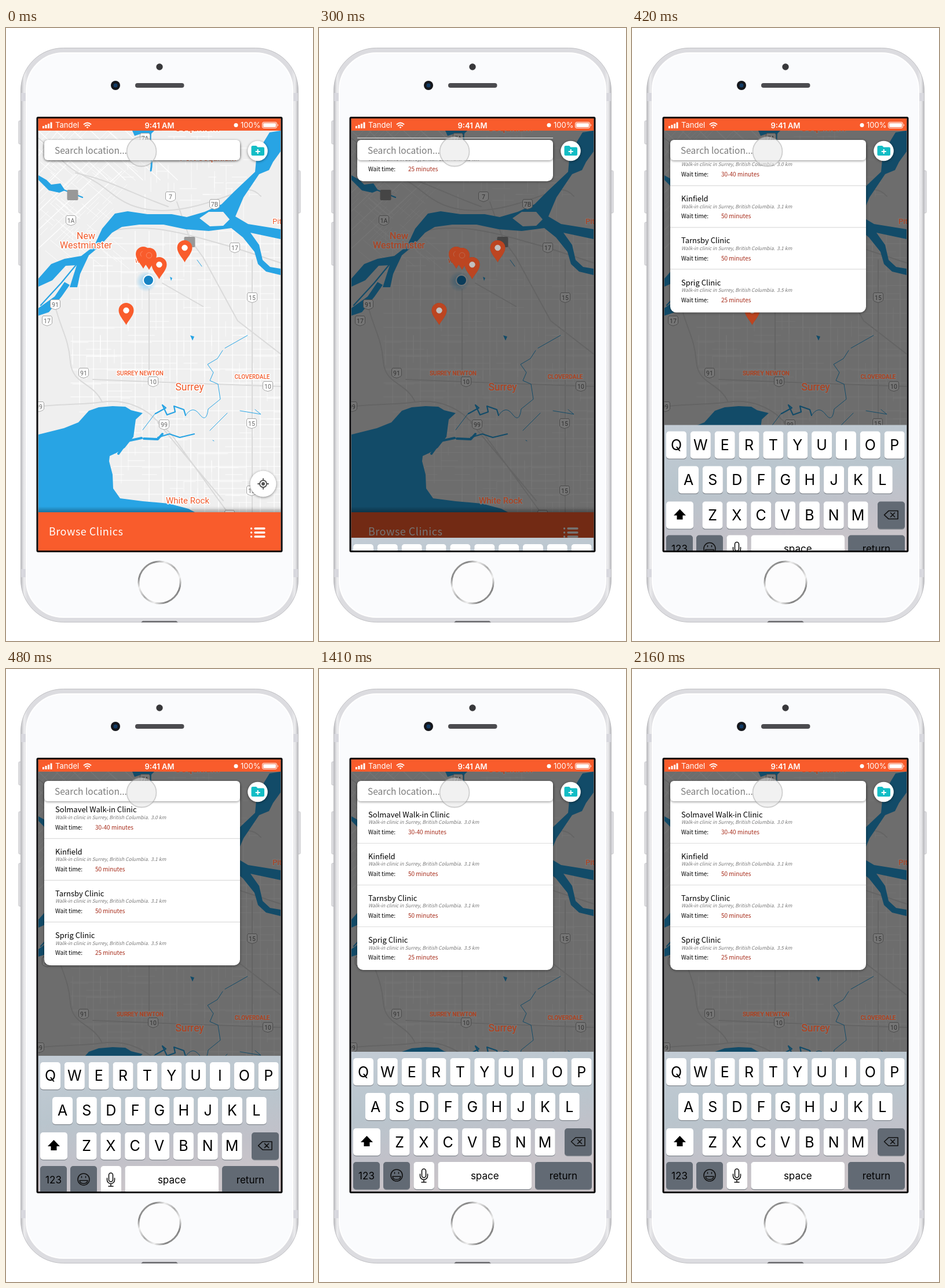
Animation of 530 by 1057 pixels, one loop 2190 ms. Source, as an HTML page:

```html
<!DOCTYPE html>
<html lang="en">
<head>
<meta charset="utf-8">
<title>Clinic search</title>
<style>
  html, body { margin: 0; width: 100%; height: 100%; overflow: hidden; background: #fff; }
  svg { display: block; width: 100vw; height: 100vh; }
  .ui { font-family: "Noto Sans CJK SC", "Noto Sans CJK JP", "Noto Sans CJK", "Open Sans", sans-serif; }
  .ios { font-family: Inter, Roboto, sans-serif; }
  .mid { text-anchor: middle; }
  .place { font-family: Roboto, sans-serif; fill: #f05a2b; text-anchor: middle; }
  .halo .place { stroke: #fff; stroke-width: 3; stroke-linejoin: round; }
  .shield { font: 10.5px Roboto, sans-serif; text-anchor: middle; fill: #666; }
  .line { fill: none; stroke-linecap: round; stroke-linejoin: round; }
  .soft { filter: drop-shadow(0 1px 2px rgba(0, 0, 0, .45)); }
</style>
</head>
<body>
<svg viewBox="0 0 530 1057">
  <defs>
    <clipPath id="screen"><rect x="55.5" y="156" width="419" height="745.5"/></clipPath>
    <clipPath id="below"><rect x="55.5" y="193" width="419" height="709"/></clipPath>
    <clipPath id="content"><rect x="55.5" y="177" width="419" height="725"/></clipPath>
    <linearGradient id="rim">
      <stop offset="0" stop-color="#b9b9bd"/><stop offset=".012" stop-color="#ececee"/>
      <stop offset=".024" stop-color="#dcdce0"/><stop offset=".976" stop-color="#dcdce0"/>
      <stop offset=".988" stop-color="#ececee"/><stop offset="1" stop-color="#b9b9bd"/>
    </linearGradient>
    <linearGradient id="ring" x2="1" y2="1">
      <stop offset="0" stop-color="#aaa"/><stop offset=".2" stop-color="#888"/>
      <stop offset=".32" stop-color="#eee"/><stop offset=".5" stop-color="#aaa"/>
      <stop offset=".68" stop-color="#f0f0f0"/><stop offset=".82" stop-color="#808080"/>
      <stop offset="1" stop-color="#ccc"/>
    </linearGradient>
    <linearGradient id="board" x2=".25" y2="1">
      <stop offset="0" stop-color="#c3ccd5"/><stop offset=".45" stop-color="#b9c5cd"/>
      <stop offset=".75" stop-color="#c1c1c9"/><stop offset="1" stop-color="#cbc5c9"/>
    </linearGradient>
    <linearGradient id="barShadow" x2="0" y2="1">
      <stop offset="0" stop-opacity="0"/><stop offset="1" stop-opacity=".3"/>
    </linearGradient>
    <radialGradient id="glow"><stop offset=".3" stop-color="#4db5ee" stop-opacity=".5"/><stop offset="1" stop-color="#4db5ee" stop-opacity="0"/></radialGradient>
    <path id="pin" fill="#f95c2c" d="M0 0C-4-8-13-16-13-25A13 13 0 0 1 13-25C13-16 4-8 0 0Z"/>
    <path id="badge" fill="#fff" stroke="#a5a5a5" d="M-7-8.5H7L8.5-6V3C8.5 6 5 7 0 8.5C-5 7-8.5 6-8.5 3V-6Z"/>
  </defs>

  <!-- phone -->
  <g fill="#e0e0e3" stroke="#b4b4b8" stroke-width=".8">
    <rect x="22" y="160" width="5" height="40" rx="1.5"/><rect x="22" y="246" width="5" height="73" rx="1.5"/>
    <rect x="22" y="335" width="5" height="74" rx="1.5"/><rect x="503" y="246" width="5" height="73" rx="1.5"/>
    <rect x="25.5" y="34.5" width="479" height="990" rx="73" fill="url(#rim)"/>
  </g>
  <path d="M26 112h10v14H26zM494 112h10v14h-10zM26 933h10v14H26zM494 933h10v14h-10z" fill="#d8d8de"/>
  <rect x="35" y="43" width="460" height="973" rx="64" fill="#fafbfd" stroke="#fff" stroke-width="2"/>
  <path d="M233 1025l3-2.5h58l3 2.5z" fill="#66666a"/>
  <circle cx="265" cy="67" r="5.7" fill="#38383b"/>
  <circle cx="189" cy="99" r="8" fill="#15171c"/><circle cx="189" cy="99" r="3.5" fill="#123c66"/>
  <rect x="223" y="95" width="84.5" height="8" rx="4" fill="#4b4b4f"/>
  <circle cx="265" cy="956" r="36" fill="#fcfcfd" stroke="url(#ring)" stroke-width="3"/>

  <g clip-path="url(#screen)">
    <rect x="55" y="156" width="420" height="746" fill="#efefef"/>
    <g id="streets" class="line" stroke="#fff"></g>
    <g class="line" stroke="#dadada" stroke-width="2">
      <path d="M56 190C85 212 100 240 135 255S185 293 215 305S290 320 352 300S420 270 440 290"/>
      <path d="M120 250C180 262 215 285 280 308M295 300L318 365L340 395L400 505L474 562M270 440L340 480M85 480C95 520 108 535 111 575S150 610 166 645M56 653C90 648 130 650 166 645S230 652 250 667L285 700L386 840M262 680L375 815M247 450V605M150 606L250 610L474 618M425 400V835M180 350C250 335 310 355 395 379L474 405"/>
    </g>
    <g fill="#28a4e4">
      <path fill-rule="evenodd" d="M166 346L188 320L210 316L244 321L286 321L312 326L343 317L372 304L394 282L430 248L433 216L455 180L474 177V213L461 231L454 245L437 252L410 292L396 325L418 338L474 347V364L422 353L437 374L443 400L456 412L474 415V426L449 420L435 407L429 386L409 361L389 345L350 350L310 347L272 339L230 339L200 343L183 353L161 377L143 392L128 424L123 447H110L122 409L103 410L80 435L56 446V432L78 407L101 398L130 393L152 376ZM334 328L350 317L375 317L386 330L375 341L352 342Z"/>
      <path d="M110 443L96 463L74 490L56 496V483L84 463L101 438Z"/>
      <path d="M56 701L100 690L125 680L143 660L160 654L184 652L206 653L216 659L236 664L224 675L220 705L205 724L190 733L179 738L178 747L184 770L185 794L197 811L236 816L281 820L315 829L328 836H56Z"/>
      <path d="M56 254L70 262L78 270L94 268L102 280L92 284L74 280L56 262ZM218 177H256L247 186L234 182L222 186ZM318 530L325 532L322 539ZM283 429L287 431L285 436Z"/>
    </g>
    <g class="line" stroke="#28a4e4">
      <path stroke-width="4" d="M194 734L210 712L234 707M238 708L262 709L270 700"/>
      <path stroke-width="2.2" d="M262 706L282 700L300 706L325 700M97 278L132 292M60 478L95 440L128 400M258 665L276 655L270 650L278 667L292 662L290 652L307 658L310 668"/>
      <path d="M236 693L258 664M310 668Q322 650 334 666T349 657L370 640L366 614L352 608L358 594L348 580L365 570L374 556M378 552L417 530M352 694L382 664M404 660L440 666L430 658M357 711L359 712M330 400L338 411"/>
      <path stroke-width="3" d="M250 177C246 200 255 225 250 246"/>
    </g>
    <g fill="#989898"><rect x="105.500" y="279" width="19" height="18" rx="2"/><rect x="307.500" y="360" width="19" height="18" rx="2"/></g>
    <g id="shields" class="shield"></g>
    <circle cx="242" cy="437" r="18" fill="url(#glow)"/>
    <circle cx="246" cy="435" r="9" fill="#1684c4" stroke="#fff" stroke-width="2"/>
    <g id="halos" class="halo"></g>
    <g id="marks"></g>

    <rect x="55" y="825" width="420" height="10" fill="url(#barShadow)"/>
    <rect x="55" y="835" width="420" height="67" fill="#f95c2c"/>
    <text id="browse" class="ui" y="875" font-size="18" letter-spacing=".5" fill="#fff">Browse Clinics</text>
    <path d="M430 863H446M430 870H446M430 877H446M423.500 863h.1M423.500 870h.1M423.500 877h.1" class="line" stroke="#fff" stroke-width="3.300"/>

    <g id="locate">
      <circle class="soft" cx="444" cy="786" r="22.500" fill="#fff"/>
      <g class="line" stroke="#555" stroke-width="1.800"><circle cx="444" cy="786" r="6"/><path d="M444 777v3M444 792v3M435 786h3M450 786h3"/></g>
      <circle cx="444" cy="786" r="3" fill="#555"/>
    </g>

    <!-- labels and pins stay brighter than the shaded map -->
    <g id="shade">
      <rect x="55" y="156" width="420" height="746" fill-opacity=".54"/>
      <use href="#marks" opacity=".55"/>
    </g>

    <g clip-path="url(#below)">
      <rect id="panel" class="soft" x="66" y="193" width="338" rx="10" fill="#fff"/>
      <g id="clinics" class="ui"></g>
    </g>
    <rect class="soft" x="66" y="193" width="338" height="35" rx="6" fill="#fff"/>
    <text class="ui" x="84" y="217" font-size="15.500" fill="#7c7c7c">Search location...</text>
    <g clip-path="url(#content)"><path id="dividers" d="M66 300.500H404M66 372.500H404M66 444.500H404" stroke="#dcdcdc" stroke-width="1.200"/></g>

    <circle class="soft" cx="434.500" cy="212" r="17.300" fill="#fff"/>
    <path d="M426 203H432L434.500 205.500H444Q446 205.500 446 207.500V218Q446 220 444 220H425.500Q423.500 220 423.500 218V205Q423.500 203 426 203Z" fill="#13bdc5"/>
    <path d="M434.700 209v8M430.700 213h8" stroke="#fff" stroke-width="2"/>
    <circle cx="234" cy="213" r="25.500" fill="#e6e6e6" fill-opacity=".55" stroke="#999" stroke-opacity=".45" stroke-width="1.800"/>

    <g id="keyboard" class="ios">
      <rect x="55" y="660" width="420" height="243" fill="url(#board)"/>
      <g id="keys"></g>
      <path d="M82.500 805L93 816H87.500V823H77.500V816H72Z"/>
      <g class="line" stroke="#111" stroke-width="1.600">
        <path d="M443 808H459V822H443L435.500 815ZM446.500 811.500L453.500 818.500M453.500 811.500L446.500 818.500"/>
        <circle cx="134" cy="873" r="10"/><path d="M127 875H141C140 882 128 882 127 875Z"/>
        <path d="M130.500 868v2M137.500 868v2M174.500 871v3a6.500 6.500 0 0 0 13 0v-3M181 881v4M177 885h8"/>
        <rect x="177.500" y="862" width="7" height="15" rx="3.500"/>
      </g>
    </g>

    <!-- status bar -->
    <rect x="55" y="156" width="420" height="21" fill="#f95c2c"/>
    <g class="ios" fill="#fff" font-size="13">
      <path d="M63 169h3v4h-3zM67.500 167h3v6h-3zM72 165h3v8h-3zM76.500 162.500h3V173h-3z"/>
      <text x="85" y="172">Tandel</text>
      <text x="265" y="172.500" class="mid" font-weight="600">9:41 AM</text>
      <circle cx="397" cy="167.500" r="3.500"/>
      <text x="405" y="172">100%</text>
      <rect x="442.500" y="162.500" width="25" height="10" rx="2.500" fill="none" stroke="#fff"/>
      <rect x="444" y="164" width="22" height="7" rx="1.300"/><path d="M469 165.500q2 2 0 4z"/>
      <path d="M134.500 166q6-5 12 0M136.700 168.700q3.800-3 7.600 0" class="line" stroke="#fff" stroke-width="1.800"/><path d="M138.500 171q2-1.500 4 0l-2 2z"/>
    </g>
  </g>
  <rect x="54" y="154.500" width="422" height="748" rx="1.500" fill="none" stroke="#0b0b0d" stroke-width="3"/>
</svg>

<script>
const byId = id => document.getElementById(id);
const fill = (id, markup) => { byId(id).innerHTML = markup; };

function drawStreets() {
  let seed = 11;
  const random = () => (seed = (seed * 16807) % 2147483647) / 2147483647;
  const snap = (min, max, step) => min + Math.floor(random() * (max - min) / step) * step;
  let minor = "", major = "";
  for (let i = 0; i < 210; i++) {
    const x = snap(115, 470, 12), y = snap(350, 830, 12), length = 14 + random() * 40;
    minor += `M${x} ${y}${i % 2 ? "h" : "v"}${length}`;
  }
  for (let i = 0; i < 70; i++) {
    minor += `M${snap(200, 430, 10)} ${snap(177, 300, 10)}${i % 2 ? "h" : "v"}${10 + random() * 30}`;
  }
  for (let i = 0; i < 110; i++) {
    const length = 15 + random() * 45, x = snap(50, 190, 9), y = snap(177, 400, 9);
    minor += `M${x} ${y}l${length * .75} ${length * (i % 2 ? .62 : -.75)}`;
  }
  for (let x = 127; x < 474; x += 24) major += `M${x} ${x < 200 ? 400 : 350}V${x < 240 ? 650 : 835}`;
  for (let y = 372; y < 835; y += 24) major += `M${y < 655 ? 112 : 185} ${y}H474`;
  for (let k = 0; k < 6; k++) major += `M56 ${220 + k * 32}L${90 + k * 22} ${177 + k * 14}M${56 + k * 30} 177l90 85`;
  fill("streets", `<path stroke-width=".8" d="${minor}"/><path stroke-width="1.2" d="${major}"/>`);
}

function drawMarks() {
  const shields = [["7A", 240, 190], ["7", 284, 291], ["7B", 360, 304], ["1A", 112, 332], ["17", 395, 379],
    ["15", 425, 465], ["91", 85, 477], ["17", 71, 505], ["91", 134, 595], ["10", 254, 610], ["10", 452, 618],
    ["99", 273, 684], ["15", 424, 682], ["15", 424, 798], ["99", 57, 653], ["", 386, 840]];
  fill("shields", shields.map(([label, x, y]) =>
    `<g transform="translate(${x} ${y})"><use href="#badge"/><text y="3.5">${label}</text></g>`).join(""));

  const places = [["Coquitlam", 330, 178, 17], ["Port Coquitlam", 349, 229, 14.5], ["New", 138, 364, 16],
    ["Westminster", 138, 380, 16], ["Pitt", 470, 338, 13], ["W", 227, 405, 9], ["SURREY NEWTON", 231.5, 599, 10, 500],
    ["CLOVERDALE", 425, 605, 10, 500], ["Surrey", 317, 625, 17.5], ["White Rock", 313.5, 820, 15]];
  const labels = places.map(([name, x, y, size, weight = 400]) =>
    `<text class="place" x="${x}" y="${y}" font-size="${size}" font-weight="${weight}">${name}</text>`).join("");

  const pins = [[237, 415, .35], [247, 417, .35], [264.5, 433, 1], [308.5, 404, 1], [207.5, 512, 1]];
  const markers = pins.map(([x, y, hole]) => `<g transform="translate(${x} ${y})"><use href="#pin"/>
    <circle cy="-25" r="4.8" fill="#fff" fill-opacity="${hole === 1 ? 1 : 0}" stroke="#fff" stroke-width=".8" stroke-opacity="${hole}"/></g>`).join("");
  fill("halos", labels);
  fill("marks", labels + markers);
}

function drawClinics() {
  const clinics = [["Solmavel Walk-in Clinic", "3.0", "30-40"], ["Kinfield", "3.1", "50"],
    ["Tarnsby Clinic", "3.1", "50"], ["Sprig Clinic", "3.5", "25"]];
  fill("clinics", clinics.map(([name, km, wait], i) => `<g transform="translate(85 ${255.5 + i * 72.2})">
    <text font-size="13">${name}</text>
    <g font-size="8.5" font-style="italic" font-weight="300" fill="#777"><text y="11.5">Walk-in clinic in Surrey, British Columbia.</text><text x="165" y="11.5">${km} km</text></g>
    <text y="29.300" font-size="10">Wait time:</text>
    <text x="69" y="29.300" font-size="10" fill="#a62a18">${wait} minutes</text></g>`).join(""));
}

function drawKeys() {
  const key = (label, x, y, width, dark, size = 25) => `
    <rect x="${x}" y="${y + 1.3}" width="${width}" height="47" rx="5" fill="#858a91"/>
    <rect x="${x}" y="${y}" width="${width}" height="47" rx="5" fill="${dark ? "#626a74" : "#fff"}"/>
    <text class="mid" x="${x + width / 2}" y="${y + 23.5 + size * .36}" font-size="${size}">${label}</text>`;
  const row = (letters, x, y) => [...letters].map((c, i) => key(c, x + i * 41.85, y, 35)).join("");
  fill("keys", row("QWERTYUIOP", 59, 671) + row("ASDFGHJKL", 80, 731) + row("ZXCVBNM", 121.5, 792) +
    key("", 59, 792, 47) + key("", 424, 792, 47, true) + key("123", 59, 850, 46, true, 17) +
    key("", 111, 850, 46, true) + key("", 163.5, 850, 35.5) + key("space", 205.5, 850, 161.5, false, 17) +
    key("return", 373, 850, 98, true, 17));
}

drawStreets();
drawMarks();
drawClinics();
drawKeys();

const LOOP = 2190, STEP = 30, OPEN_AT = 292, SLIDE = 728;
const clamp = v => Math.min(1, Math.max(0, v));
const show = (id, visible) => byId(id).setAttribute("display", visible ? "inline" : "none");
const shift = (id, y) => byId(id).setAttribute("transform", `translate(0 ${y})`);
const start = performance.now();

// The search screen cuts in at once; its list and keyboard then ease out into place.
function render() {
  const elapsed = (performance.now() - start) % LOOP;
  const t = Math.floor(elapsed / STEP) * STEP;
  const open = t >= OPEN_AT;
  const remaining = (1 - clamp((t - OPEN_AT) / SLIDE)) ** 12;
  const drop = 291 * remaining;
  show("shade", open);
  show("locate", !open);
  byId("browse").setAttribute("x", open ? 85 : 74);
  byId("panel").setAttribute("height", 326 - drop);
  shift("clinics", -drop);
  shift("dividers", -drop);
  shift("keyboard", 250 * remaining);
  requestAnimationFrame(render);
}
render();
</script>
</body>
</html>
```
